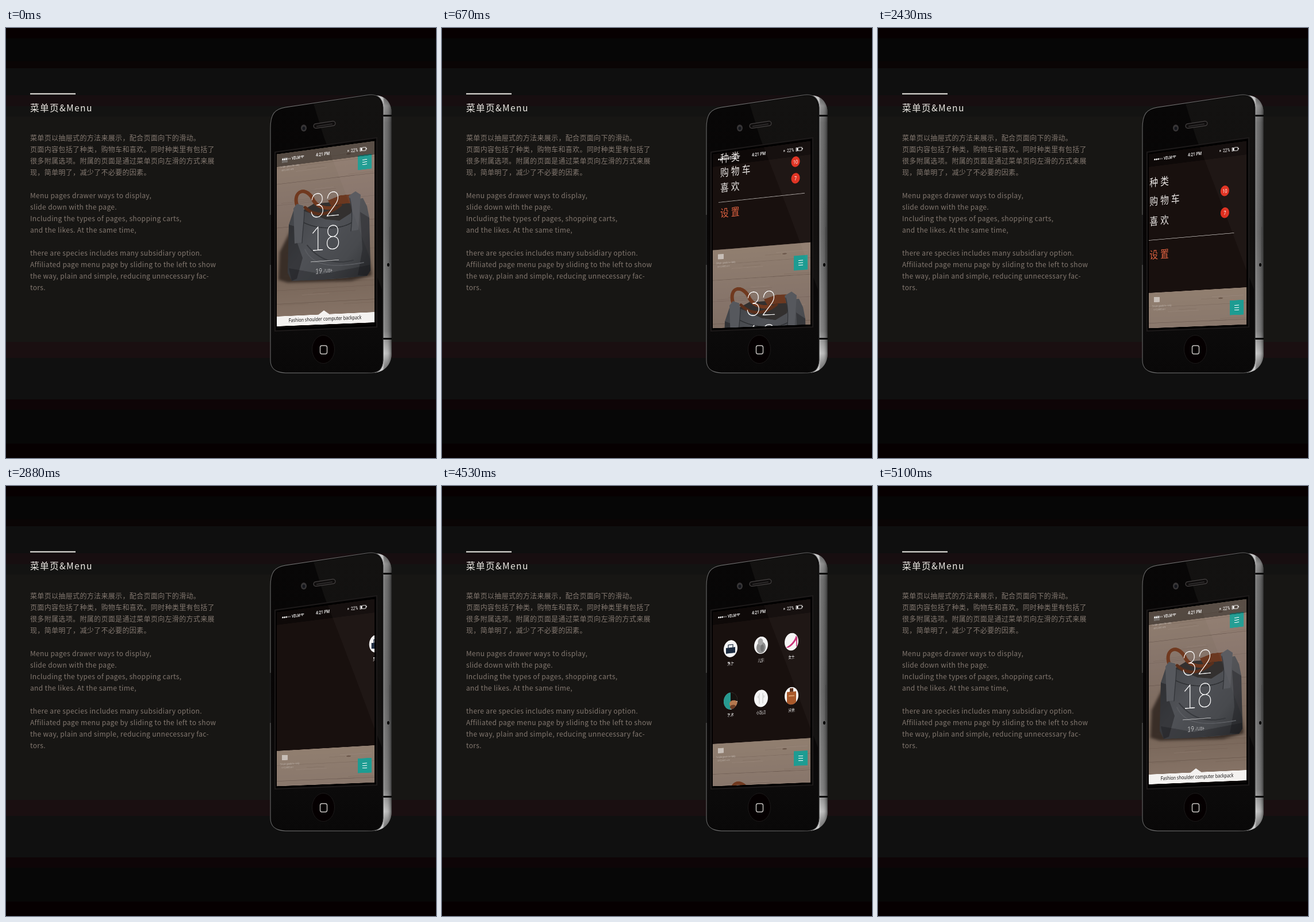
Recreate the animation shown at these times as an HTML page with a canvas. Size 748x748 px, loop 5830 ms.

```html
<!DOCTYPE html>
<html lang="zh">
<head>
<meta charset="utf-8">
<title>Menu</title>
<style>
  html, body { margin: 0; width: 100%; height: 100%; overflow: hidden; background: #080808; }
  canvas { position: absolute; left: 0; top: 0; }
  h1, p { position: absolute; left: 42px; margin: 0; white-space: pre; font-family: "Noto Sans CJK SC", "Noto Sans CJK", sans-serif; font-weight: 400; }
  h1 { top: 127px; font-size: 15.6px; line-height: 22px; letter-spacing: 1.4px; color: #efebe6; }
  p { top: 181px; font-size: 12px; line-height: 20px; letter-spacing: .34px; color: #837870; }
</style>
</head>
<body>
<canvas id="stage" width="748" height="748"></canvas>
<h1>菜单页&amp;Menu</h1>
<p>菜单页以抽屉式的方法来展示，配合页面向下的滑动。
页面内容包括了种类，购物车和喜欢。同时种类里有包括了
很多附属选项。附属的页面是通过菜单页向左滑的方式来展
现，简单明了，减少了不必要的因素。

Menu pages drawer ways to display,
slide down with the page.
Including the types of pages, shopping carts,
and the likes. At the same time,

there are species includes many subsidiary option.
Affiliated page menu page by sliding to the left to show
the way, plain and simple, reducing unnecessary fac-
tors.</p>
<script>
const LOOP = 5830, STEP = 30;
const LEFT = 471, RIGHT = 641, MID = 556, TOP = 208, BOTTOM = 519;
const LAYER_Y = 190, LAYER_H = 340, RES = 2, NARROW = .8;
const CJK = '"Noto Sans CJK SC", "Noto Sans CJK", sans-serif';
const LATIN = '"Noto Sans", sans-serif';

const makeCanvas = (w, h) => Object.assign(document.createElement('canvas'), { width: w, height: h });
const stage = document.getElementById('stage').getContext('2d');
const base = makeCanvas(748, 748);
const layer = makeCanvas((RIGHT - LEFT) * RES, LAYER_H * RES);
const g = layer.getContext('2d');

// Perspective: each screen column is shifted and scaled vertically.
const stretch = x => 1 - .000307 * (MID - x);
const lift = x => .1986 * (MID - x);
const flatY = (x, y) => (y - lift(x)) / stretch(x);
const screenY = (x, y) => y * stretch(x) + lift(x);

function gradient(c, x0, y0, x1, y1, ...stops) {
  const grad = c.createLinearGradient(x0, y0, x1, y1);
  stops.forEach(([at, color]) => grad.addColorStop(at, color));
  return grad;
}

function fillPath(c, d, fill) {
  c.fillStyle = fill;
  c.fill(new Path2D(d));
}

function strokePath(c, d, color, width) {
  c.strokeStyle = color;
  c.lineWidth = width;
  c.stroke(new Path2D(d));
}

function drawBackground(c) {
  const bands = [
    [0, '#070001'], [18, '#060606'], [58, '#0a0505'], [70, '#0f0f0f'], [117, '#170e10'],
    [136, '#131312'], [154, '#171614'], [546, '#1a0f11'], [574, '#101010'],
    [646, '#0e0507'], [664, '#070707'], [723, '#060001']
  ];
  bands.forEach(([y, color]) => {
    c.fillStyle = color;
    c.fillRect(0, y, 748, 748 - y);
  });
  c.fillStyle = '#f2efea';
  c.fillRect(42, 113.5, 79, 2);
}

function drawPhone(c) {
  const side = 'M634 118C656 114 671 126 671 150V564C671 588 656 600 636 600H610Z';
  const face = 'M460 174C460 150 467 141 486 138L630 116.500C646 114.500 655 122 656 138V578C655 594 648 599 636 600H486C468 599 460 592 460 578Z';
  fillPath(c, side, gradient(c, 0, 116, 0, 600, [0, '#4a4a4a'], [.04, '#8f8f8f'], [.1, '#6e6e6e'],
    [.5, '#686868'], [.85, '#808080'], [.93, '#c4c4c4'], [1, '#5a5a5a']));
  fillPath(c, side, gradient(c, 655, 0, 671, 0, [0, 'rgba(255,255,255,.65)'], [.2, 'rgba(255,255,255,.08)'],
    [.6, 'rgba(0,0,0,.08)'], [.85, 'rgba(0,0,0,.3)'], [1, 'rgba(0,0,0,.65)']));
  c.fillStyle = '#080808';
  c.fillRect(656, 151, 15, 3);
  c.fillRect(656, 539, 15, 3);
  strokePath(c, 'M667.500 346V408', '#444', 1);
  fillPath(c, 'M663 412a2 3 0 1 0 4 0a2 3 0 1 0 -4 0', '#000');

  fillPath(c, face, gradient(c, 0, 117, 0, 600, [0, '#080707'], [.5, '#070505'], [.82, '#0c0b0b'], [1, '#090808']));
  strokePath(c, face, gradient(c, 460, 0, 656, 0, [0, '#606060'], [.15, '#7a7a7a'], [.85, '#666'], [1, '#2a2a2a']), 1.2);
  strokePath(c, 'M460 325V412', '#151515', 1.6);
  fillPath(c, 'M535 132L632 118C646 117 653 124 654 138V455L553 190Z', 'rgba(255,235,230,.045)');

  c.fillStyle = '#010000';
  c.strokeStyle = '#1d1a1a';
  c.lineWidth = 2;
  c.beginPath();
  c.moveTo(468, 216); c.lineTo(645, 191); c.lineTo(645, 520); c.lineTo(468, 527);
  c.closePath();
  c.fill();
  c.stroke();

  fillPath(c, 'M513 174a5 6 0 1 0 10 0a5 6 0 1 0 -10 0', '#383637');
  fillPath(c, 'M515.500 174.500a2.500 3 0 1 0 5 0a2.500 3 0 1 0 -5 0', '#14161c');
  c.lineCap = 'round';
  strokePath(c, 'M539 170.500L569 166', '#454242', 9);
  strokePath(c, 'M539 170.500L569 166', '#0f0d0d', 6.5);
  strokePath(c, 'M541 171L567 167', '#2c2a2a', 2);
  c.lineCap = 'butt';

  c.beginPath();
  c.ellipse(552, 559, 19.5, 24.5, 0, 0, 7);
  c.fillStyle = '#050001';
  c.fill();
  c.strokeStyle = '#1c1a1a';
  c.lineWidth = 1;
  c.stroke();
  c.strokeStyle = '#c9c6c4';
  c.lineWidth = 1.4;
  c.beginPath();
  c.roundRect(546.5, 552.5, 12, 14.5, 3);
  c.stroke();
}

function label(str, x, y, size, { color = '#fff', weight = 400, font = LATIN, align = 'left', spacing = 0, outline = 0 } = {}) {
  g.save();
  g.translate(x, y + size * .37);
  g.scale(NARROW, 1);
  g.font = `${weight} ${size}px ${font}`;
  g.textAlign = align;
  g.letterSpacing = spacing + 'px';
  g.fillStyle = g.strokeStyle = color;
  g.fillText(str, 0, 0);
  if (outline) {
    g.lineWidth = outline;
    g.strokeText(str, 0, 0);
  }
  g.restore();
}

function oval(x, y, rx, ry, color) {
  g.fillStyle = color;
  g.beginPath();
  g.ellipse(x, y, rx, ry, 0, 0, 7);
  g.fill();
}

function rule(x0, x1, y, color, width = 1) {
  g.fillStyle = color;
  g.fillRect(x0, y - width / 2, x1 - x0, width);
}

// Points are given as seen on the tilted screen.
function poly(color, ...xy) {
  g.beginPath();
  for (let i = 0; i < xy.length; i += 2) g.lineTo(xy[i], flatY(xy[i], xy[i + 1]));
  g.closePath();
  g.fillStyle = color;
  g.fill();
}

function curve(color, width, x0, y0, ...xy) {
  g.beginPath();
  g.moveTo(x0, flatY(x0, y0));
  for (let i = 0; i < xy.length; i += 6) {
    const [a, b, c, d, e, f] = xy.slice(i, i + 6);
    g.bezierCurveTo(a, flatY(a, b), c, flatY(c, d), e, flatY(e, f));
  }
  g.strokeStyle = color;
  g.lineWidth = width;
  g.stroke();
}

function drawBag() {
  g.lineCap = 'round';
  g.filter = 'blur(5px)';
  poly('rgba(30,22,18,.7)', 476, 390, 496, 350, 625, 350, 636, 430, 600, 440, 490, 443, 474, 438);
  g.filter = 'none';

  poly('#33302f', 515, 318, 535, 306, 575, 302, 604, 302, 603, 336, 560, 340, 518, 332);
  poly('#6b3820', 560, 300, 582, 291, 604, 289, 606, 304, 584, 306, 566, 310);
  curve('#70391f', 6, 506, 308, 499, 284, 520, 275, 533, 296, 538, 309, 552, 316, 572, 312);
  curve('#5b2f1b', 5, 520, 312, 535, 326, 555, 330, 582, 308);

  const cloth = gradient(g, 490, 320, 634, 440, [0, '#414347'], [.35, '#505257'], [.7, '#484a4e'], [1, '#303235']);
  poly(cloth, 492, 342, 500, 318, 517, 318, 532, 323, 556, 333, 580, 335, 600, 322, 606, 298, 621, 296,
    628, 310, 632, 330, 634, 422, 628, 431, 590, 435, 550, 438, 497, 440, 490, 426);
  poly('rgba(18,19,22,.4)', 492, 342, 502, 345, 506, 372, 516, 400, 506, 436, 497, 440, 490, 426);
  poly('rgba(18,19,22,.35)', 616, 320, 632, 330, 634, 422, 628, 431, 612, 430, 620, 385);
  poly('rgba(18,19,22,.3)', 492, 418, 550, 428, 633, 412, 634, 422, 628, 431, 550, 438, 497, 440);
  curve('#2f3134', 1.5, 517, 338, 540, 350, 580, 352, 602, 338);
  curve('#37393d', 2, 524, 378, 545, 404, 570, 412, 604, 404);
  curve('#5b5d62', 1.5, 520, 385, 535, 418, 575, 416, 622, 408);

  poly('#56585d', 500, 314, 506, 306, 517, 309, 519, 322, 515, 373, 502, 375);
  poly('#56585d', 596, 292, 608, 284, 617, 290, 613, 351, 601, 353, 602, 318);
  curve('#303236', 1.2, 519, 316, 519, 335, 516, 350, 515, 374);
  curve('#303236', 1.2, 598, 296, 603, 315, 602, 335, 600, 353);
  g.lineCap = 'butt';
}

function drawPhoto(off) {
  g.save();
  g.translate(0, off);
  g.fillStyle = gradient(g, 0, TOP, 0, BOTTOM, [0, '#917f70'], [.3, '#86746a'], [.66, '#7a685b'],
    [.75, '#7a685b'], [1, '#8a776a']);
  g.fillRect(LEFT, TOP, 170, 312);
  [234, 262, 300, 340, 452, 476].forEach((y, i) => rule(LEFT, RIGHT, y, i % 2 ? 'rgba(60,42,32,.28)' : 'rgba(60,42,32,.16)', .8));
  for (let i = 0; i < 34; i++) {
    const y = TOP + (i * 73 % 311), x = LEFT + (i * 47 % 130);
    rule(x, x + 25 + i * 31 % 50, y, i % 3 ? 'rgba(60,40,30,.1)' : 'rgba(225,205,190,.1)', .9);
  }
  oval(596, 224, 4, 1.2, 'rgba(65,42,32,.45)');
  drawBag();

  g.fillStyle = 'rgba(255,255,255,.5)';
  g.fillRect(480, 216, 10, 9);
  label('Simple goods for daily', 477, 232, 4, { color: 'rgba(255,255,255,.45)' });
  label('carry and care', 479, 238, 4, { color: 'rgba(255,255,255,.4)' });

  const thin = { font: 'Lato, sans-serif', weight: 100, align: 'center', outline: .8 };
  label('32', 555, 306, 58.5, thin);
  label('18', 555, 364, 58.5, thin);
  rule(530, 579, 405, 'rgba(255,255,255,.65)', .9);
  label('19', 538, 421.5, 13, { font: 'Lato, sans-serif', weight: 300 });
  label('ZUBE', 552, 422, 8, { font: 'Lato, sans-serif', weight: 300 });

  g.fillStyle = '#1d9c92';
  g.fillRect(612, 229, 24, 25);
  [-4, 0, 4].forEach(dy => rule(620, 628, 241.5 + dy, '#fff', 1));

  g.fillStyle = '#f4f2f0';
  g.fillRect(LEFT, 498, 170, 17.5);
  g.beginPath();
  g.moveTo(543, 498.5); g.lineTo(553, 491); g.lineTo(563, 498.5);
  g.fill();
  label('Fashion shoulder computer backpack', 555, 505.5, 9, { color: '#1b1918', weight: 500, align: 'center' });
  g.fillStyle = '#0a0706';
  g.fillRect(LEFT, 515.5, 170, 5);
  g.restore();
}

function drawMenu(closed, dx) {
  const y = rest => rest - (135 + (rest - 260) * .8) * closed;
  const item = (str, rest, color) => label(str, 484 + dx, y(rest), 18.5, { font: CJK, weight: 300, spacing: 5, color });
  const badge = (str, rest) => {
    oval(615 + dx, y(rest), 7.5, 9, '#df2f1f');
    label(str, 615 + dx, y(rest), 9, { align: 'center', weight: 300 });
  };
  item('种类', 259.5, '#e9e6e4');
  item('购物车', 293, '#e9e6e4');
  item('喜欢', 328.5, '#e9e6e4');
  badge('10', 288.5);
  badge('7', 326);
  rule(481 + dx, 631 + dx, y(362), '#a9a4a1', .9);
  item('设置', 388.5, '#dd6140');
}

// Category icons, drawn around the centre of a white oval.
const icons = [
  () => {
    g.fillStyle = '#1c2b40';
    g.fillRect(-8, -2, 16, 10);
    g.strokeStyle = '#1c2b40';
    g.lineWidth = 1.2;
    g.strokeRect(-4, -7, 8, 6);
  },
  () => {
    oval(0, 4, 8, 10, '#8d8d8d');
    oval(-1, -6, 4.5, 6, '#a3a3a3');
    oval(2, 5, 3, 6, '#717171');
  },
  () => {
    g.fillStyle = '#c92f78';
    g.beginPath();
    g.moveTo(8, -10); g.quadraticCurveTo(4, 3, -10, 9); g.quadraticCurveTo(-3, 11, 4, 3);
    g.lineTo(8, -2); g.lineTo(8, 9); g.lineTo(9.5, 9); g.lineTo(10, -6);
    g.fill();
  },
  () => {
    g.fillStyle = '#279a90';
    g.fillRect(-12, -15, 12, 30);
    g.fillStyle = '#17120f';
    g.fillRect(0, -15, 12, 16);
    oval(5, 5, 7, 6, '#b5794f');
    oval(4, 11, 5, 4, '#6d3d25');
  },
  () => {
    [-3, 3].forEach(x => {
      g.fillStyle = '#c2c2c2';
      g.fillRect(x - .5, -9, 1, 18);
      oval(x * 1.4, -3, 2, 2.5, '#dadada');
    });
  },
  () => {
    g.fillStyle = '#a9592b';
    g.fillRect(-8, -7, 16, 23);
    g.fillStyle = '#5a2f1c';
    g.fillRect(-3, -13, 6, 6);
    g.fillStyle = '#d59a68';
    g.fillRect(-5, -1, 10, 2);
  }
];

function drawGrid(t, closing) {
  const rows = [
    { y: 284, gap: 26, travel: 143, start: 2820, names: ['男士', '儿童', '女士'] },
    { y: 380, gap: 24.5, travel: 213, start: 2910, names: ['艺术', '小玩意', '其他'] }
  ];
  rows.forEach((row, r) => {
    const dx = 190 * (1 - progress(t, row.start, 22)) ** 2;
    const y = row.y - row.travel * closing;
    row.names.forEach((name, i) => {
      const x = 502 + 53 * i + dx;
      g.save();
      g.translate(x, y);
      g.beginPath();
      g.ellipse(0, 0, 12, 15, 0, 0, 7);
      g.fillStyle = '#f5f5f5';
      g.fill();
      g.clip();
      icons[r * 3 + i]();
      g.restore();
      label(name, x, y + row.gap, 7, { font: CJK, align: 'center', weight: 500 });
    });
  });
}

function drawStatus() {
  const y = 219, font = 'Roboto, sans-serif';
  for (let i = 0; i < 5; i++) oval(481.5 + i * 3.1, y, 1.2, 1.5, i < 3 ? '#fff' : 'rgba(255,255,255,.4)');
  label('VELM', 497, y, 7, { font, weight: 500 });
  g.strokeStyle = '#fff';
  g.lineWidth = .9;
  [1, 2.6, 4.2].forEach(r => {
    g.beginPath();
    g.arc(515.5, y + 2, r, -2.3, -.84);
    g.stroke();
  });
  label('4:21 PM', 551, y - .5, 8, { font, weight: 500, align: 'center' });
  g.fillStyle = 'rgba(255,255,255,.6)';
  g.fillRect(594, y - 1.5, 2.5, 3);
  label('22%', 600, y, 8.3, { font });
  g.lineWidth = .8;
  g.strokeRect(616, y - 2.5, 10, 5.5);
  g.fillStyle = '#fff';
  g.fillRect(617, y - 1.5, 2.6, 3.5);
  g.fillRect(626.5, y - 1, 1.2, 2.5);
}

// Share of an animation done, advancing in fixed steps.
function progress(t, start, steps) {
  const n = t < start ? 0 : Math.floor((t - start) / STEP) + 1;
  return Math.min(1, n / steps);
}

function drawScreen(t) {
  const closing = progress(t, 4530, 20);
  const open = t < 4530 ? 1 - (1 - progress(t, 370, 22)) ** 1.7 : 1 - closing;

  g.setTransform(RES, 0, 0, RES, -LEFT * RES, -LAYER_Y * RES);
  g.clearRect(LEFT, LAYER_Y, 170, LAYER_H);
  g.save();
  g.beginPath();
  g.rect(LEFT, TOP, 170, BOTTOM - TOP);
  g.clip();
  g.fillStyle = '#18100e';
  g.fillRect(LEFT, TOP, 170, 312);
  drawPhoto(248 * open);
  g.fillStyle = 'rgba(0,0,0,.42)';
  g.fillRect(LEFT, TOP, 170, 23);
  if (t < 3000) drawMenu(1 - open, -175 * progress(t, 2430, 15));
  if (t >= 2820) drawGrid(t, closing);
  drawStatus();
  poly('rgba(255,225,210,.03)', 553, 190, 641, 190, 641, 422);
  g.restore();
}

function render(now) {
  drawScreen(now % LOOP);
  stage.drawImage(base, 0, 0);
  for (let x = LEFT; x < RIGHT; x++) {
    const mid = x + .5;
    stage.drawImage(layer, (x - LEFT) * RES, 0, RES, LAYER_H * RES,
      x, screenY(mid, LAYER_Y), 1, LAYER_H * stretch(mid));
  }
}

const paint = base.getContext('2d');
drawBackground(paint);
drawPhone(paint);

let begin;
function tick(now) {
  begin ??= now;
  render(now - begin);
  requestAnimationFrame(tick);
}
render(0);
requestAnimationFrame(tick);
</script>
</body>
</html>
```
